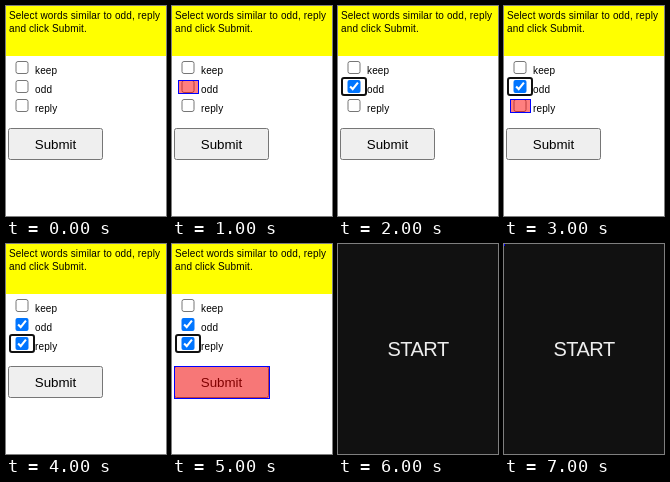
Write an HTML page that moves like this. It is 160 px wide and 210 px high and loops after 8000 ms.

```html
<!DOCTYPE html>
<html lang="en">
<head>
<meta charset="utf-8">
<title>Word picker</title>
<style>
  html, body { margin: 0; width: 100%; height: 100%; overflow: hidden; background: #fff; }
  body { position: relative; font: 10px/13px "Liberation Sans", Arial, sans-serif; letter-spacing: .13px;
    color: #000; pointer-events: none; }
  body > *, .row > * { position: absolute; box-sizing: border-box; }
  #query { left: 0; top: 0; width: 160px; height: 50px; padding: 3px; background: #ff0; white-space: nowrap; }
  .row { left: 6px; width: 100px; height: 13px; }
  .row input { left: 0; top: 0; width: 20px; height: 13px; margin: 0; }
  .row span { left: 23px; top: 3px; }
  #ring { left: 3px; width: 26px; height: 19px; border: 2px solid #101010; border-radius: 3px; }
  #submit { left: 2px; top: 122px; width: 95px; height: 32px; margin: 0; padding: 0;
    font: 13.3333px "Liberation Sans", Arial, sans-serif; }
  #cover { left: 0; top: 0; width: 160px; height: 210px; background: #111; color: #eee;
    font-size: 20px; line-height: 210px; letter-spacing: -.5px; text-align: center; }
  #mark { border: 1px solid #00f; background: rgba(255, 0, 0, .5) padding-box; }
</style>
</head>
<body>
<div id="query">Select words similar to odd, reply<br>and click Submit.</div>
<div class="row" style="top:55px"><input type="checkbox"><span>keep</span></div>
<div class="row" style="top:74px"><input type="checkbox" id="odd"><span>odd</span></div>
<div class="row" style="top:93px"><input type="checkbox" id="reply"><span>reply</span></div>
<button id="submit" type="button">Submit</button>
<div id="ring"></div>
<div id="cover">START</div>
<div id="mark"></div>
<script>
  const el = id => document.getElementById(id);
  const [odd, reply, ring, cover, mark] = ["odd", "reply", "ring", "cover", "mark"].map(el);

  // Click highlights by second: left, top, width, height
  const marks = {
    1: [6, 74, 21, 14],
    3: [6, 93, 21, 14],
    5: [2, 122, 96, 33],
    7: [-1, 0, 2, 2]
  };
  const show = (node, visible) => { node.style.display = visible ? "block" : "none"; };

  function draw(now) {
    const step = Math.floor(now / 1000) % 8;
    odd.checked = step >= 2;
    reply.checked = step >= 4;
    show(ring, step >= 2);
    ring.style.top = (step < 4 ? 71 : 90) + "px";
    show(cover, step >= 6);
    show(mark, step in marks);
    if (step in marks) {
      ["left", "top", "width", "height"].forEach((side, i) => {
        mark.style[side] = marks[step][i] + "px";
      });
    }
  }

  let start;
  function tick(now) {
    start ??= now;
    draw(now - start);
    requestAnimationFrame(tick);
  }
  draw(0);
  requestAnimationFrame(tick);
</script>
</body>
</html>
```
